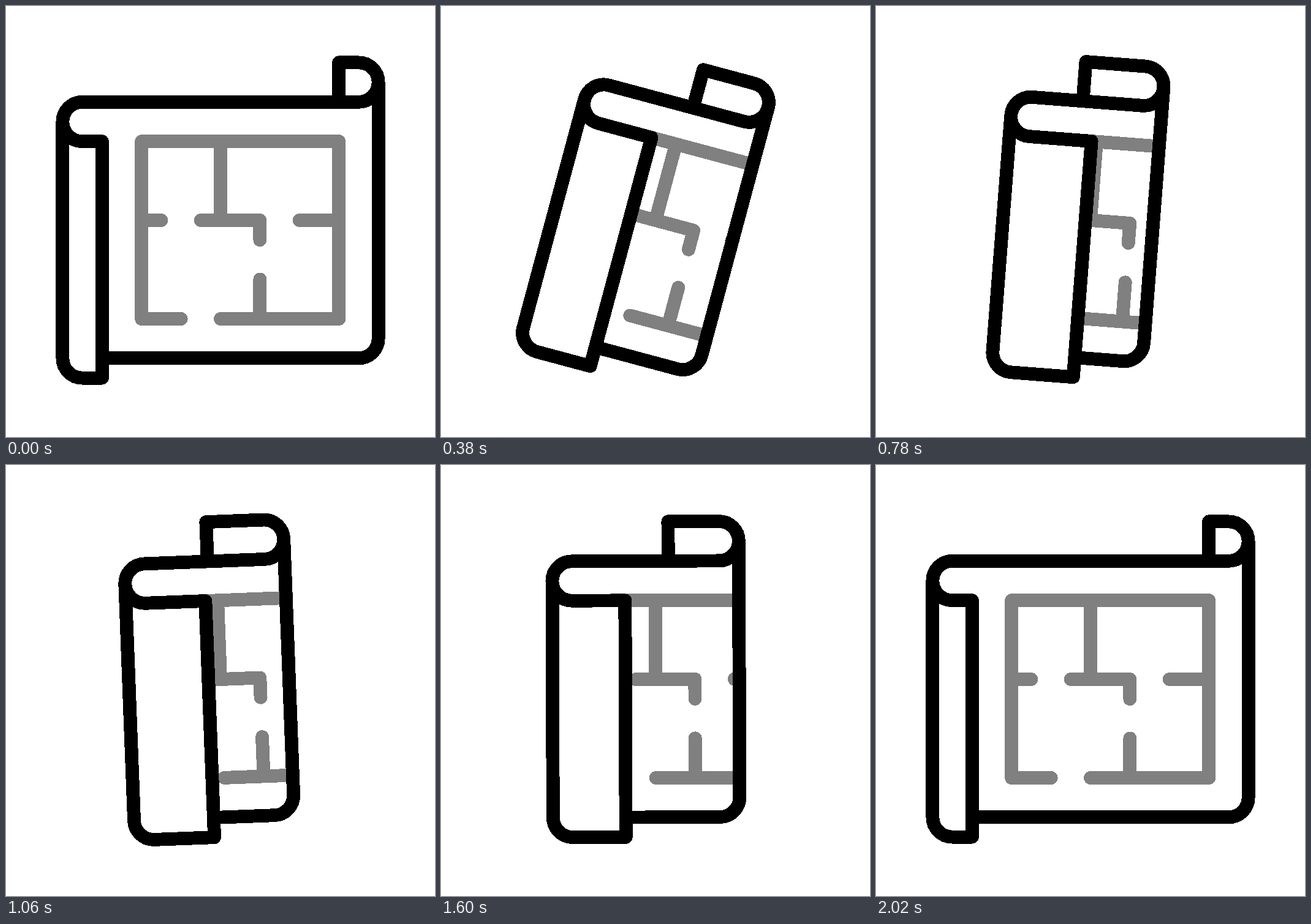
Recreate the animation shown at these times as an HTML page. Size 700x704 px, loop 2.4 s.

```html
<!DOCTYPE html>
<html lang="en">
<head>
<meta charset="utf-8">
<title>Blueprint roll</title>
<style>
  html, body { margin: 0; width: 100%; height: 100%; overflow: hidden; background: #fff; }
  svg { display: block; width: 100vw; height: 100vh; shape-rendering: crispEdges; }
  path { fill: none; stroke-width: .68; stroke-linecap: round; stroke-linejoin: round; }
  #plan { stroke: #808080; }
  #sheet, #flap { stroke: #000; }
  #flap { fill: #fff; }
</style>
</head>
<body>
<svg viewBox="0 0 700 704">
  <clipPath id="edge"><rect id="visible" x="-9" y="-9" width="17" height="18"/></clipPath>
  <g id="roll">
    <g clip-path="url(#edge)">
      <path id="plan" d="M-2 5H-4V-4H6V5H0 M-4 0H-3 M-1 0H2V1 M0-4V0 M4 0H6 M2 3V5"/>
    </g>
    <path id="flap"/>
    <path id="sheet"/>
  </g>
</svg>
<script>
const LOOP = 2400, STEP = 20, UNIT = 32.2;
const el = id => document.getElementById(id);
const roll = el('roll'), flap = el('flap'), sheet = el('sheet'), visible = el('visible');

// Cubic Bezier easing, solved by bisection.
function bezier(x1, y1, x2, y2) {
  const at = (a, b, s) => 3 * a * s * (1 - s) ** 2 + 3 * b * s * s * (1 - s) + s ** 3;
  return x => {
    let lo = 0, hi = 1;
    for (let i = 0; i < 24; i++) {
      const mid = (lo + hi) / 2;
      if (at(x1, x2, mid) < x) lo = mid; else hi = mid;
    }
    return at(y1, y2, lo);
  };
}
const smooth = bezier(1 / 3, 0, 2 / 3, 1);
const drift = bezier(1 / 3, 0, 2 / 3, .62);
const unroll = bezier(1 / 3, 0, .3, 1);

// Each key: time, value, easing into it.
const CURL = [[0, 0], [530, 3.65, smooth], [1560, 2.857, drift], [2020, 0, unroll]];
const TILT = [[0, 0], [620, 22.5, smooth], [927, -11.5, smooth], [1179, 5.7, smooth],
  [1412, -2.75, smooth], [1637, 0, smooth]];

function sample(keys, t) {
  const i = keys.findIndex(k => k[0] > t);
  if (i < 0) return keys[keys.length - 1][1];
  const [t0, v0] = keys[i - 1], [t1, v1, ease] = keys[i];
  return v0 + (v1 - v0) * ease((t - t0) / (t1 - t0));
}

function draw(t) {
  const curl = sample(CURL, t);
  const left = -8 + curl, leftFlap = -6 + 1.607 * curl;
  const right = 8 - 1.35 * curl, rightFlap = 6 - 1.918 * curl;

  roll.setAttribute('transform',
    `translate(350 350) rotate(${sample(TILT, t)}) scale(${UNIT})`);
  visible.setAttribute('width', right + 9);
  flap.setAttribute('d', `M${left} -5V7a1 1 0 0 0 1 1H${leftFlap}V-4`);
  sheet.setAttribute('d',
    `M${leftFlap} -4H${left + 1}a1 1 0 0 1 0 -2H${right - 1}` +
    `a1 1 0 0 0 0 -2H${rightFlap}V-6` +
    `M${right} -7V6a1 1 0 0 1 -1 1H${leftFlap}`);
}

const start = performance.now();
function tick() {
  const t = (performance.now() - start) % LOOP;
  draw(Math.floor(t / STEP) * STEP);
  requestAnimationFrame(tick);
}
tick();
</script>
</body>
</html>
```
